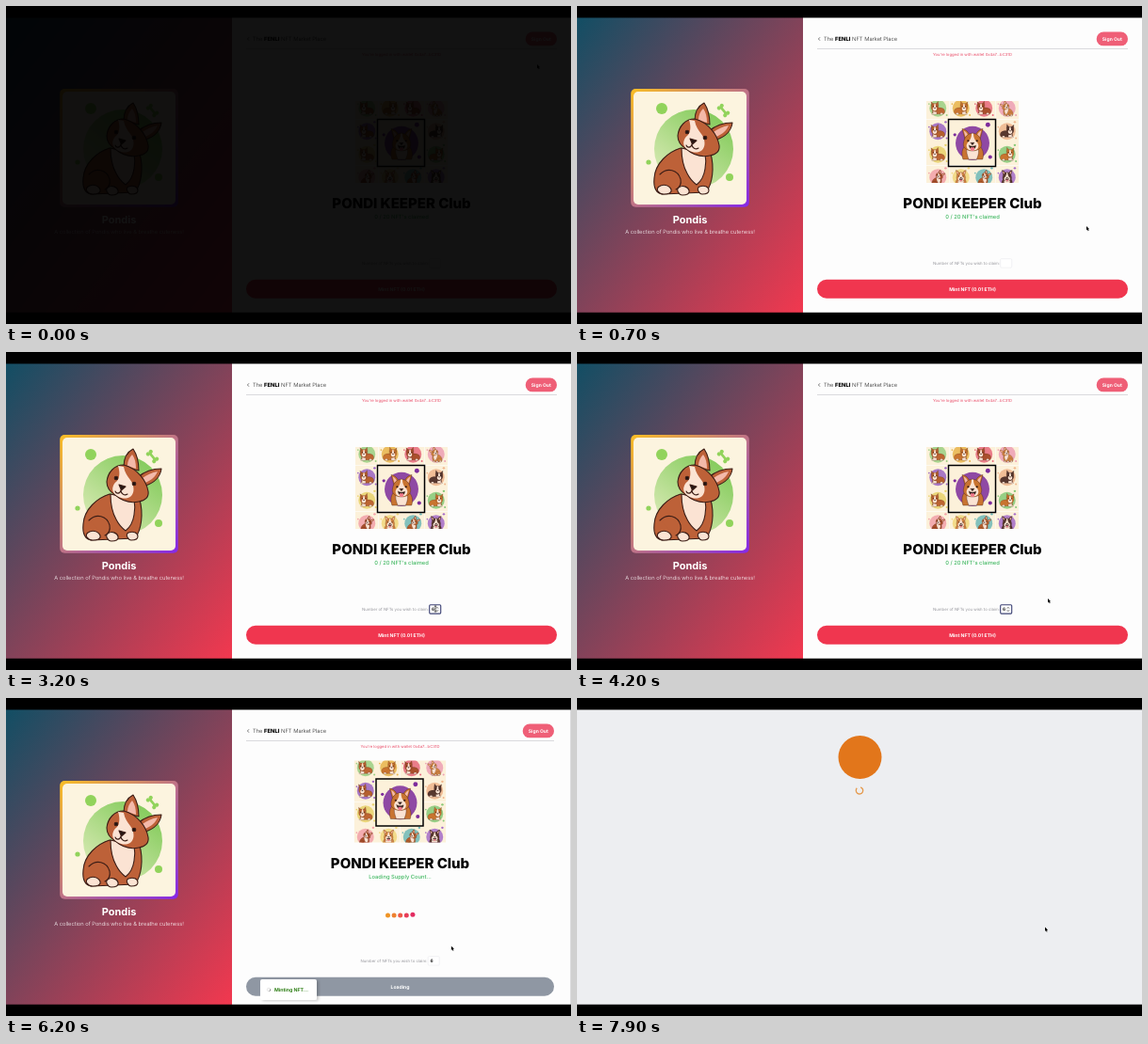
Recreate the animation shown at these times as an HTML page. Size 600x338 px, loop 8000 ms.

```html
<!DOCTYPE html>
<html lang="en">
<head>
<meta charset="utf-8">
<title>Mint page</title>
<style>
html, body { margin: 0; width: 100%; height: 100%; overflow: hidden; background: #000; }
svg { display: block; width: 100vw; height: 100vh; }
text { font-family: Inter, "Open Sans", sans-serif; text-rendering: geometricPrecision; }
.mid { text-anchor: middle; }
.bold { font-weight: 700; }
.ink { stroke: #3b1d16; stroke-width: 1.1; stroke-linejoin: round; stroke-linecap: round; }
.fur { fill: currentColor; }
.cream { fill: #fbe3d3; }
</style>
</head>
<body>
<svg viewBox="0 0 600 338">
<defs>
  <linearGradient id="side" x2="1" y2="1">
    <stop stop-color="#124e64"/><stop offset="1" stop-color="#f2384f"/>
  </linearGradient>
  <linearGradient id="frame" x2="1" y2="1">
    <stop stop-color="#fbbf24"/><stop offset="1" stop-color="#8428ea"/>
  </linearGradient>
  <linearGradient id="green" x1=".1" y1="1" x2=".8" y2=".1">
    <stop stop-color="#e1edbd"/><stop offset="1" stop-color="#86cc5e"/>
  </linearGradient>
  <clipPath id="crop"><rect x="371" y="101" width="98" height="87"/></clipPath>
  <clipPath id="cell"><rect width="120" height="120"/></clipPath>
  <filter id="shade" x="-20%" y="-40%" width="140%" height="200%">
    <feDropShadow dy="1" stdDeviation="1.5" flood-opacity=".2"/>
  </filter>

  <!-- Dogs, each in a 120 by 120 box -->
  <g id="sit" class="ink">
    <path class="fur" d="M50 60C37 64 23 76 22 92c-1 10 2 16 9 17l46-2c7-9 9-26 5-41z"/>
    <path class="cream" d="M51 60c0 10 2 20 6 27 3 6 6 9 10 12 5-4 8-10 9-17 1-6 1-11 0-16z"/>
    <path class="fur" d="M28 88c8-8 19-5 22 5 1 5-1 9-5 11"/>
    <path class="cream" d="M27 101c4-3 11-2 13 3 1 4-3 5-8 5s-9-5-5-8zm21 1c4-3 10-1 11 3s-3 5-7 5-7-6-4-8zm22-1c5-2 10 0 10 4s-4 4-7 4-7-6-3-8z"/>
    <path class="fur" d="M65 31C65 22 69 15 75 12c4 6 6 14 6 23zM80 42c7-6 16-9 25-9-1 8-7 15-17 18z"/>
    <path fill="#f3b9a9" stroke="none" d="M69 30c0-5 2-9 5-12 3 4 4 9 4 15zM85 43c4-3 10-6 16-7-2 5-6 9-13 12z"/>
    <path class="fur" d="M65 29c-10 0-17 8-18 18 0 7 4 11 9 14 7 6 16 9 25 7 7-1 11-5 10-11-2-11-11-24-26-28z"/>
    <path class="cream" stroke="none" d="M59 30l6 1c1 6 4 10 7 14 4 5 5 13 1 17-6 5-15 2-19-4-2-4 0-9 4-12 3-4 3-10 1-16z"/>
    <circle cx="57" cy="43" r="1.8" fill="#241512"/><circle cx="76" cy="49" r="1.8" fill="#241512"/>
    <path fill="#241512" d="M60 50l7 2-4.5 4z"/>
    <path fill="none" d="M62 56c-1 4-5 4-6 1m6-1c0 4 4 6 7 4"/>
  </g>
  <g id="lie" class="ink" stroke-width="2">
    <path class="fur" d="M38 62c20-9 52-8 62 6 6 9 5 20-2 27l-70 2c-7-14 0-27 10-35z"/>
    <path class="cream" d="M30 75c7 8 16 10 21 6l2 16-31 3c-5-3-1-9 7-9zM75 91c8-5 17-2 19 7l-20 2z"/>
    <path class="fur" d="M21 42l-5-24 17 14zm26-9l14-18 3 26z"/>
    <path class="fur" d="M20 38c10-12 31-12 41 0 8 20-2 40-21 40S13 59 20 38z"/>
    <path class="cream" stroke="none" d="M38 30h6l4 21c11 10 4 25-8 25S22 61 34 51z"/>
    <circle cx="30" cy="48" r="2.5" fill="#241512"/><circle cx="52" cy="48" r="2.5" fill="#241512"/>
    <path fill="#241512" d="M36 55h10l-5 6z"/>
  </g>
  <g id="front" class="ink">
    <path class="fur" d="M38 66c-12 10-14 28-8 45h62c6-18 1-36-12-45z"/>
    <path class="cream" d="M43 72c-4 14 0 24 5 39h25c6-14 9-25 4-39z"/>
    <path class="fur" d="M36 46L27 14c10 1 19 8 23 18zM70 32c5-10 13-17 23-18l-9 33z"/>
    <path fill="#f3b9a9" stroke="none" d="M38 40l-6-20c6 3 10 7 13 13zM75 33c3-6 7-10 13-13l-6 21z"/>
    <path class="fur" d="M60 28c-17 0-27 15-29 34-1 14 14 22 29 22s30-8 29-22c-2-19-12-34-29-34z"/>
    <path class="cream" stroke="none" d="M57 29h6c0 12 3 19 10 26 11 11 7 28-13 28S36 66 47 55c7-7 10-14 10-26z"/>
    <circle cx="46" cy="52" r="2.5" fill="#241512"/><circle cx="74" cy="52" r="2.5" fill="#241512"/>
    <path fill="#241512" d="M54 58h12l-6 7zM49 67q11 5 22 0-2 12-11 12t-11-12z"/>
    <path fill="#f0788a" stroke="none" d="M54 73h12v5c0 8-12 8-12 0z"/>
  </g>
</defs>

<g id="scene">
  <g id="page">
    <rect y="12" width="602" height="314" fill="#fdfdfd"/>
    <rect y="12" width="240" height="314" fill="url(#side)"/>
    <rect x="57.2" y="88" width="125.6" height="125.8" rx="5" fill="url(#frame)"/>
    <rect x="60" y="91" width="120" height="120" rx="5" fill="#fcf4df"/>
    <g fill="#91d35b">
      <circle cx="124" cy="152" r="42" fill="url(#green)"/>
      <circle cx="90" cy="109" r="6"/><circle cx="76" cy="166" r="2.6"/><circle cx="162" cy="182" r="4"/>
      <g transform="translate(155.5 111) rotate(50)">
        <rect x="-5" y="-1.3" width="10" height="2.6"/>
        <circle cx="-5" cy="-1.9" r="2.1"/><circle cx="-5" cy="1.9" r="2.1"/><circle cx="5" cy="-1.9" r="2.1"/><circle cx="5" cy="1.9" r="2.1"/>
      </g>
    </g>
    <use href="#sit" x="60" y="91" color="#bd6138"/>
    <g class="mid" fill="#fff">
      <text class="bold" x="120" y="230.5" font-size="11">Pondis</text>
      <text x="120" y="241.5" font-size="5.8" font-weight="300">A collection of Pondis who live &amp; breathe cuteness!</text>
    </g>

    <path d="M258 33.3l-1.6 1.7 1.6 1.7" fill="none" stroke="#444" stroke-width=".7"/>
    <text x="262" y="37" font-size="5.8" font-weight="300" fill="#222">The <tspan font-weight="800" fill="#000">FENLI</tspan> NFT Market Place</text>
    <rect id="rule" x="255" y="45" width="330" height=".6" fill="#c4c4c8"/>
    <g id="signOut">
      <rect x="551.7" y="27.5" width="33.3" height="14.8" rx="7.4" fill="#ef5f77"/>
      <text class="mid bold" x="568.3" y="36.8" font-size="5" fill="#fff">Sign Out</text>
    </g>
    <g id="center">
      <text class="mid" x="420" y="52.8" font-size="4.2" fill="#e94a66">You're logged in with wallet 0x4a7...bC31D</text>
      <g id="hero">
        <g id="collage" clip-path="url(#crop)"></g>
        <text class="mid" x="420" y="215.2" font-size="15" font-weight="800">PONDI KEEPER Club</text>
        <text class="mid" id="claimed" x="420" y="226.2" font-size="5.8" font-weight="500" fill="#40b861"></text>
      </g>
      <g id="dots"></g>
      <g id="form">
        <text x="378" y="275" font-size="4.3" fill="#96969c">Number of NFTs you wish to claim:</text>
        <rect id="field" x="449.7" y="268.7" width="12" height="9.4" rx="1" fill="#fff"/>
        <text id="value" class="bold" x="452" y="275.2" font-size="4.8" fill="#222"></text>
        <path id="steps" d="M456.8 272.6l1.1-1.3 1.1 1.3M456.8 274.3l1.1 1.3 1.1-1.3" fill="none" stroke="#333" stroke-width=".7"/>
        <path id="caret" d="M452.8 271v5" stroke="#222" stroke-width=".6"/>
      </g>
    </g>
    <g id="mint">
      <rect id="mintBox" x="255" y="290.8" width="330" height="20" rx="10"/>
      <text class="mid bold" id="mintText" y="302.7" font-size="5.1" fill="#fff"></text>
    </g>
    <rect id="scrollbar" x="599" y="12" width="3" height="314" fill="#dedee0"/>
    <g id="toast">
      <rect x="-30" y="-11" width="60" height="22" rx="2" fill="#fff" filter="url(#shade)"/>
      <circle cx="-21" r="1.8" fill="none" stroke="#ddd" stroke-width=".7"/>
      <path id="toastSpin" d="M0-1.8A1.8 1.8 0 0 1 1.8 0" fill="none" stroke="#666" stroke-width=".7"/>
      <text class="bold" x="-15" y="1.9" font-size="5.2" fill="#2c7d13">Minting NFT...</text>
    </g>
  </g>

  <g id="popup">
    <rect id="popupBox" fill="#edeef1"/>
    <g id="lights">
      <rect width="40" height="8" rx="2" fill="#f7f7f8"/>
      <circle cx="4" cy="4" r="1.9" fill="#f25a55"/><circle cx="10.5" cy="4" r="1.9" fill="#efb83c"/><circle cx="17" cy="4" r="1.9" fill="#3dae4d"/>
    </g>
    <g id="wallet">
      <circle cx="300.5" cy="63" r="23" fill="#e2761b"/>
      <path id="spin" d="M-2-3.1A3.7 3.7 0 1 0 2-3.1" fill="none" stroke="#e5984a" stroke-width="1.3"/>
    </g>
  </g>
  <circle id="ring" r="9" fill="none" stroke="#222" stroke-width="1"/>
  <path id="arrow" d="M0 0V4.4L1 3.5 1.8 5.2 2.6 4.8 1.8 3.2H3.2Z" stroke="#fff" stroke-width=".4" paint-order="stroke"/>
  <path id="beam" d="M-1.2-3H1.2M0-3V3M-1.2 3H1.2" stroke="#111" stroke-width=".7"/>
</g>
<rect id="dark" width="600" height="338"/>
<path d="M0 0H600V12.5H0ZM0 325.7H600V338H0Z"/>
</svg>

<script>
const LOOP = 8000, LOADING = 5650, SLIDE = 6730;
const $ = id => document.getElementById(id);
const set = (id, attrs) => { for (const k in attrs) $(id).setAttribute(k, attrs[k]); };
const move = (id, x, y, more = '') => set(id, { transform: `translate(${x} ${y}) ${more}` });
const show = (id, on) => { $(id).style.display = on ? '' : 'none'; };
const clamp = v => Math.min(1, Math.max(0, v));
const smooth = v => (v = clamp(v), v * v * (3 - 2 * v));
const mix = (a, b, p) => a + (b - a) * p;

// Picture wall: twelve small tiles around one large picture
const tints = ['#9ccf83', '#e9b44c', '#e8697c', '#ee9fb4', '#9a63c4', '#f0b58c',
               '#e9d26a', '#86c977', '#f3a0a8', '#f2d77d', '#6fb9b8', '#a56bc8'];
const furs = ['#bd6532', '#c9742f', '#a94f2c', '#d18443', '#b5602f', '#58382f'];

function tile(col, row, scale, tint, dog, fur, flip) {
  const place = `translate(${371 + col * 24.5} ${96 + row * 24.5}) scale(${scale})`;
  const pose = `translate(60 64) scale(${flip ? -.82 : .82} .82) translate(-60 -62)`;
  return `<g transform="${place}" clip-path="url(#cell)" color="${fur}">
    <rect width="120" height="120" fill="#fcf1da"/>
    <circle cx="60" cy="62" r="44" fill="${tint}" opacity=".85"/>
    <g fill="${tint}"><circle cx="14" cy="40" r="4"/><circle cx="100" cy="14" r="6"/><circle cx="106" cy="98" r="5"/></g>
    <use href="#${dog}" transform="${pose}"/></g>`;
}

let wall = '', n = 0;
for (let row = 0; row < 4; row++) for (let col = 0; col < 4; col++) {
  if (row % 3 && col % 3) continue;
  const dog = row == 3 ? (col % 2 ? 'front' : 'sit') : (row + col) % 4 == 3 ? 'sit' : 'lie';
  wall += tile(col, row, 24.5 / 120, tints[n], dog, furs[n % 6], n % 2);
  n++;
}
wall += tile(1, 1, 49 / 120, '#7d2c9c', 'front', '#c97431');
wall += '<rect x="394.5" y="120.5" width="50" height="50" fill="none" stroke="#000" stroke-width="1.5"/>';
$('collage').innerHTML = wall;

$('dots').innerHTML = ['#ef9426', '#ee8130', '#ee5a49', '#e83d58', '#e32c61']
  .map(c => `<circle r="2.5" fill="${c}"/>`).join('');

// Pointer stops: time, x, y
const stops = [[0, 564, 62], [600, 541, 234], [1200, 541, 234], [1900, 456, 273], [3400, 456, 273],
               [4000, 500, 262], [4500, 500, 262], [5150, 428, 301], [5750, 428, 301], [6500, 497, 243.5]];

function pointer(t) {
  const i = stops.findIndex(s => s[0] > t);
  if (i < 0) return stops.at(-1).slice(1);
  const [a, b] = [stops[i - 1], stops[i]];
  const p = smooth((t - a[0]) / (b[0] - a[0]));
  return [mix(a[1], b[1], p), mix(a[2], b[2], p)];
}

function draw(t) {
  const loading = t >= LOADING;
  const focused = t >= 2000 && t < 5300;
  const typed = t >= 3000;

  set('dark', { opacity: clamp(.93 - t / 560) });

  // Page
  const shift = -622 * smooth((t - SLIDE) / 800);
  move('page', shift, 0);
  const width = loading ? 327 : 330;
  set('rule', { width });
  set('mintBox', { width, fill: loading ? '#8f97a3' : '#f0364f' });
  set('mintText', { x: 255 + width / 2 });
  $('mintText').textContent = loading ? 'Loading' : 'Mint NFT (0.01 ETH)';
  $('claimed').textContent = loading ? 'Loading Supply Count...' : "0 / 20 NFT's claimed";
  move('signOut', width - 330, 0);
  move('center', (width - 330) / 2, 0);
  move('hero', 0, loading ? -34.5 : 0);
  move('form', 0, loading ? 6 : 0);
  move('mint', 0, loading ? 6 : 0);
  show('scrollbar', loading);

  // Number field
  set('field', { stroke: focused ? '#3c4274' : '#e4e4e8', 'stroke-width': focused ? 1.1 : .5 });
  $('value').textContent = typed ? '6' : '';
  show('steps', focused);
  show('caret', focused && !typed && t % 1000 < 500);

  // Bouncing dots
  show('dots', loading);
  [...$('dots').children].forEach((dot, i) => {
    const hop = Math.max(0, Math.cos((t - 6900) * Math.PI / 500 - (i - 3) * .9)) ** 3;
    dot.setAttribute('cx', 407 + i * 6.6);
    dot.setAttribute('cy', 231 - 4 * hop);
  });

  // Toast
  const rise = 1 - (1 - clamp((t - LOADING) / 350)) ** 3;
  show('toast', loading);
  move('toast', 300, mix(345, 310, rise), `scale(${mix(.6, 1, rise)})`);
  move('toastSpin', -21, 0, `rotate(${t * .36})`);

  // Wallet window growing to full screen
  const grow = smooth((t - 6900) / 630);
  const x = 622 + shift, y = mix(132, 12, grow);
  show('popup', t >= SLIDE);
  set('popupBox', { x, y, width: mix(40, 600, grow), height: 330 - y, rx: 3 * (1 - grow) });
  move('lights', x, y);
  show('lights', grow < .3);
  show('wallet', t >= 7550);
  move('spin', 300, 98.3, `rotate(${(t - 7900) * .36 - 15})`);

  // Pointer
  const [px, py] = pointer(t);
  const inField = Math.abs(px - 455.7) < 6 && Math.abs(py - 273.4) < 5;
  show('arrow', !inField);
  show('beam', inField);
  move('arrow', px, py);
  move('beam', px, py);
  show('ring', t >= 5300 && t < 5600);
  move('ring', px, py);
}

function tick(now) {
  draw(now % LOOP);
  requestAnimationFrame(tick);
}
draw(0);
requestAnimationFrame(tick);
</script>
</body>
</html>
```
